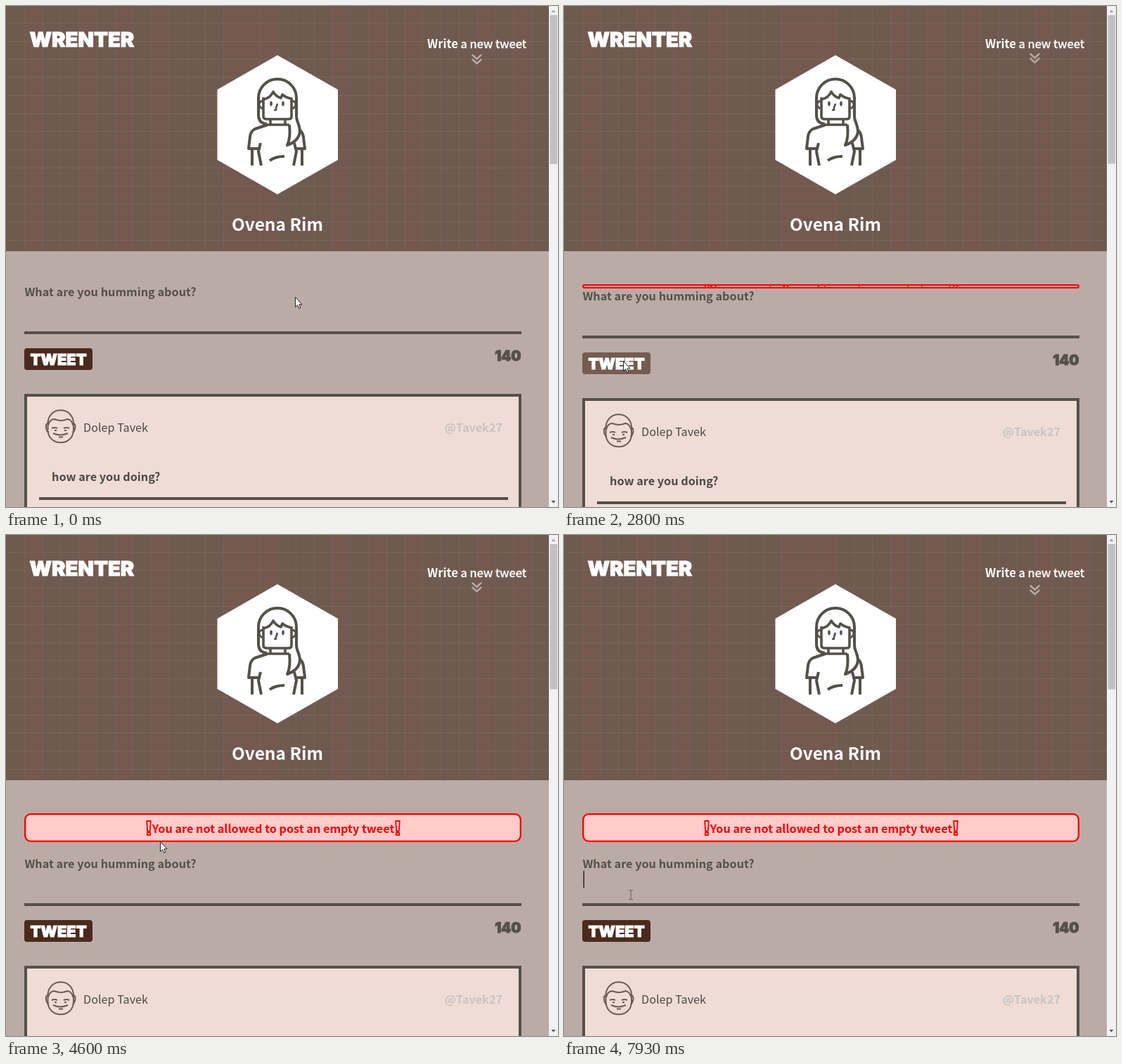
These frames come from a looping animation (785x713 px, 8 s). An HTML page with a canvas:

```html
<!DOCTYPE html>
<html lang="en">
<head>
<meta charset="utf-8">
<title>New post</title>
<style>
  html, body { margin: 0; width: 100%; height: 100%; overflow: hidden; background: #bbaba6; }
  canvas { display: block; }
</style>
</head>
<body>
<canvas id="stage" width="785" height="713"></canvas>
<script>
const ctx = document.getElementById('stage').getContext('2d');
const LOOP = 8000;
const INK = '#545149';
const SANS = '"Noto Sans CJK JP", "Noto Sans CJK SC", "Noto Sans", sans-serif';
const HEAVY = 'Inter, Roboto, sans-serif';

// Pointer path: time, x, y
const PATH = [
  [0, 411, 414], [70, 408, 416], [870, 145, 470], [1150, 16, 521],
  [1530, 105, 401], [1800, 100, 440], [2300, 92, 455], [2600, 87, 490],
  [2700, 84, 505], [3900, 85, 505], [4600, 219, 436], [4730, 242, 428],
  [5050, 300, 424], [5530, 243, 470], [5850, 96, 510], [6350, 96, 512],
  [6900, 96, 512], [7100, 95, 512], [8000, 95, 512]
];

const SLIDE = { start: 2753, span: 600 };
const clamp = v => Math.max(0, Math.min(1, v));

function rect(x, y, w, h, color) {
  ctx.fillStyle = color;
  ctx.fillRect(x, y, w, h);
}

function round(x, y, w, h, r) {
  ctx.beginPath();
  ctx.roundRect(x, y, w, h, Math.min(r, h / 2));
}

function poly(points, color) {
  ctx.beginPath();
  points.forEach(([x, y]) => ctx.lineTo(x, y));
  ctx.closePath();
  ctx.fillStyle = color;
  ctx.fill();
}

function line(d, color, width, cap = 'butt') {
  ctx.strokeStyle = color;
  ctx.lineWidth = width;
  ctx.lineCap = cap;
  ctx.lineJoin = 'round';
  ctx.stroke(new Path2D(d));
}

function text(str, x, y, size, weight, color, align = 'left', family = SANS, extra = 0) {
  ctx.font = `${weight} ${size}px ${family}`;
  ctx.textAlign = align;
  ctx.fillStyle = ctx.strokeStyle = color;
  ctx.fillText(str, x, y);
  if (extra) {
    ctx.lineWidth = extra;
    ctx.lineJoin = 'miter';
    ctx.strokeText(str, x, y);
  }
  return ctx.measureText(str).width;
}

const display = (str, x, y, size, color, align) =>
  text(str, x, y, size, 900, color, align, HEAVY, 1);

function plaid() {
  const cell = 25.75;
  rect(0, 0, 772, 349, '#6f5a50');
  for (const i of [1, 4, 6, 8, 12, 13, 14, 18, 20, 22, 26, 28]) {
    rect(i * cell, 0, cell, 349, 'rgba(125,86,80,.28)');
  }
  for (let i = 1; i < 31; i++) rect(Math.round(i * cell), 0, 1, 349, 'rgba(160,140,130,.14)');
  for (let i = 1; i < 14; i++) rect(0, Math.round(i * cell - 2), 772, 1, 'rgba(160,140,130,.22)');
}

function portrait() {
  poly([[386, 70], [472, 119], [472, 219], [386, 268], [300.5, 219], [300.5, 119]], '#fff');
  // Hair and ponytail
  line('M371 168Q359 167 359 155V131A27 27 0 0 1 413 131V157C413 165 418 169 418 178Q417 192 400 198Q405 188 403 169', INK, 4);
  // Face, fringe and ears
  line('M366 130V157Q366 161 371 161H402Q406 161 406 157V131', INK, 3.6);
  line('M366 133Q376 131 380 122Q384 129 391 131L393 126Q399 131 407 132', INK, 3.6);
  line('M365 135Q360 136 360 140T365 146M407 135Q412 136 412 140T407 146', INK, 3);
  ctx.fillStyle = INK;
  for (const x of [377, 394]) {
    ctx.beginPath();
    ctx.ellipse(x, 139, 1.8, 3.4, 0, 0, 7);
    ctx.fill();
  }
  line('M386 139L384 145M381 148H384V144', INK, 2.6);
  // Neck, shirt and arms
  line('M376 161V169M397 161V169M371 169H403', INK, 3.6);
  line('M372 169L354 175Q348 178 347 186L345 203H359M417 176Q422 179 423 187L425 203H413', INK, 4);
  line('M350 203V227M421 203V227M362 195L359 207L363 227M410 195L413 207L409 227', INK, 4);
  line('M375 220Q383 214 396 214', INK, 4);
}

function header(t) {
  plaid();
  display('WRENTER', 33.5, 57.5, 29.2, '#fff');
  const w = text('Write', 599, 60, 16.6, 700, '#fff');
  text(' a new tweet', 599 + w, 60, 16.6, 400, '#fff', 'left', SANS, .45);

  const y = 76.2 + 2.4 * Math.cos((t - 3765) / 600 * Math.PI * 2);
  ctx.save();
  ctx.translate(669.5, y);
  line('M-6 -6L0 -.5L6 -6M-6 .5L0 6L6 .5', '#bbaba6', 2.5, 'round');
  ctx.restore();

  portrait();
  text('Ovena Rim', 386, 320, 24.4, 700, '#fff', 'center');
}

function mark(x, y) {
  ctx.save();
  ctx.translate(x, y);
  line('M-2.8 -10.5H2.8L1.8 4H-1.8ZM-2.2 6H2.2V9.5H-2.2Z', '#f00', 1.8);
  ctx.restore();
}

function alertBox(e) {
  const h = Math.ceil(5 + 36 * e);
  const border = 2.3;
  const outline = () => round(26 + border / 2, 396 + border / 2, 707 - border, h - border, 8);
  outline();
  ctx.fillStyle = '#ffcbcb';
  ctx.fill();
  ctx.save();
  ctx.beginPath();
  ctx.rect(28, 398, 703, h - 4);
  ctx.clip();
  const mid = 404 + 13.5 * e;
  text('You are not allowed to post an empty tweet', 380, mid + 6, 16.25, 700, '#f00', 'center');
  mark(203, mid);
  mark(557, mid);
  ctx.restore();
  outline();
  ctx.strokeStyle = '#f00';
  ctx.lineWidth = border;
  ctx.stroke();
}

function smallFace() {
  const c = '#6b5d55';
  line('M59.5 594C60 569 95.5 569 96 594V604C95 627 60.5 627 59.5 604Z', c, 2);
  line('M60 594Q56 594 57 600Q58 607 61 606M95.5 594Q99 594 98.5 600Q97 607 94.5 606', c, 2);
  line('M60 597Q62 588 69 588Q78 592 87 588Q93 588 95.5 597', c, 2);
  line('M65 601Q69 599 73 601M82 601Q86 599 90 601M69 604H72M83 604H86', c, 2);
  line('M67 608Q77 613 88 608M75 613.5H81', c, 2);
}

function form(p, hover, caret) {
  ctx.save();
  ctx.translate(0, p);
  text('What are you humming about?', 26.5, 413, 16.25, 700, INK);
  if (caret) rect(27.5, 417, 1.3, 24, '#111');
  rect(26, 463, 707, 4, INK);
  round(26, 487, 97, 31, 4);
  ctx.fillStyle = hover ? '#755b51' : '#4b2a1e';
  ctx.fill();
  display('TWEET', 74.5, 511, 21.8, '#fff', 'center');
  display('140', 732.5, 505, 20, INK, 'right');

  rect(26, 552, 707, 300, INK);
  rect(30, 556, 699, 300, '#eedcd5');
  smallFace();
  text('Dolep Tavek', 110, 605.5, 16.2, 400, '#4b4a45');
  text('@Tavek27', 706, 605.5, 16.2, 700, '#c8c3c4', 'right');
  text('how are you doing?', 65, 676, 16.25, 700, '#4b4a45');
  rect(47, 699, 667, 4, INK);
  ctx.restore();
}

function scrollbar(p) {
  rect(772, 0, 13, 713, '#f1f1f1');
  rect(773.5, 13, 10.5, 212 - p * .09, '#c1c1c1');
  poly([[775.5, 9], [781.5, 9], [778.5, 5.5]], '#a3a3a3');
  poly([[775.5, 704], [781.5, 704], [778.5, 707.5]], '#505050');
}

function pointerAt(t) {
  const i = Math.max(1, PATH.findIndex(k => k[0] > t));
  const [t0, x0, y0] = PATH[i - 1];
  const [t1, x1, y1] = PATH[i];
  const u = clamp((t - t0) / (t1 - t0));
  const s = u * u * (3 - 2 * u);
  return [x0 + (x1 - x0) * s, y0 + (y1 - y0) * s];
}

function pointer(x, y, beam) {
  ctx.save();
  ctx.translate(Math.round(x), Math.round(y));
  if (beam) {
    line('M-3 -6.5H-1Q0 -6.5 0 -5V5Q0 6.5 -1 6.5H-3M3 -6.5H1Q0 -6.5 0 -5M0 5Q0 6.5 1 6.5H3', '#6b6460', 1.1);
  } else {
    const d = 'M.5 .5V14.5L3.6 11.7L5.7 16.3L7.8 15.4L5.8 10.8H10Z';
    ctx.fillStyle = '#fff';
    ctx.fill(new Path2D(d));
    line(d, '#222', 1);
  }
  ctx.restore();
}

function caretOn(t) {
  const from = t >= 5890 ? 5890 : t >= 1830 && t < SLIDE.start ? 1830 : null;
  return from !== null && Math.floor((t - from) / 500) % 2 === 0;
}

function draw(t) {
  const open = t >= SLIDE.start;
  const e = .5 - Math.cos(Math.PI * clamp((t - SLIDE.start) / SLIDE.span)) / 2;
  const p = open ? Math.round(5 + 56 * e) : 0;
  const [x, y] = pointerAt(t);
  const inside = (l, top, r, bottom) => x > l && x < r && y > top + p && y < bottom + p;

  rect(0, 0, 785, 713, '#bbaba6');
  header(t);
  form(p, inside(26, 487, 123, 518), caretOn(t));
  if (open) alertBox(e);
  scrollbar(p);
  pointer(x, y, inside(26, 417, 733, 463));
}

function tick() {
  draw(performance.now() % LOOP);
  requestAnimationFrame(tick);
}
tick();
</script>
</body>
</html>
```
